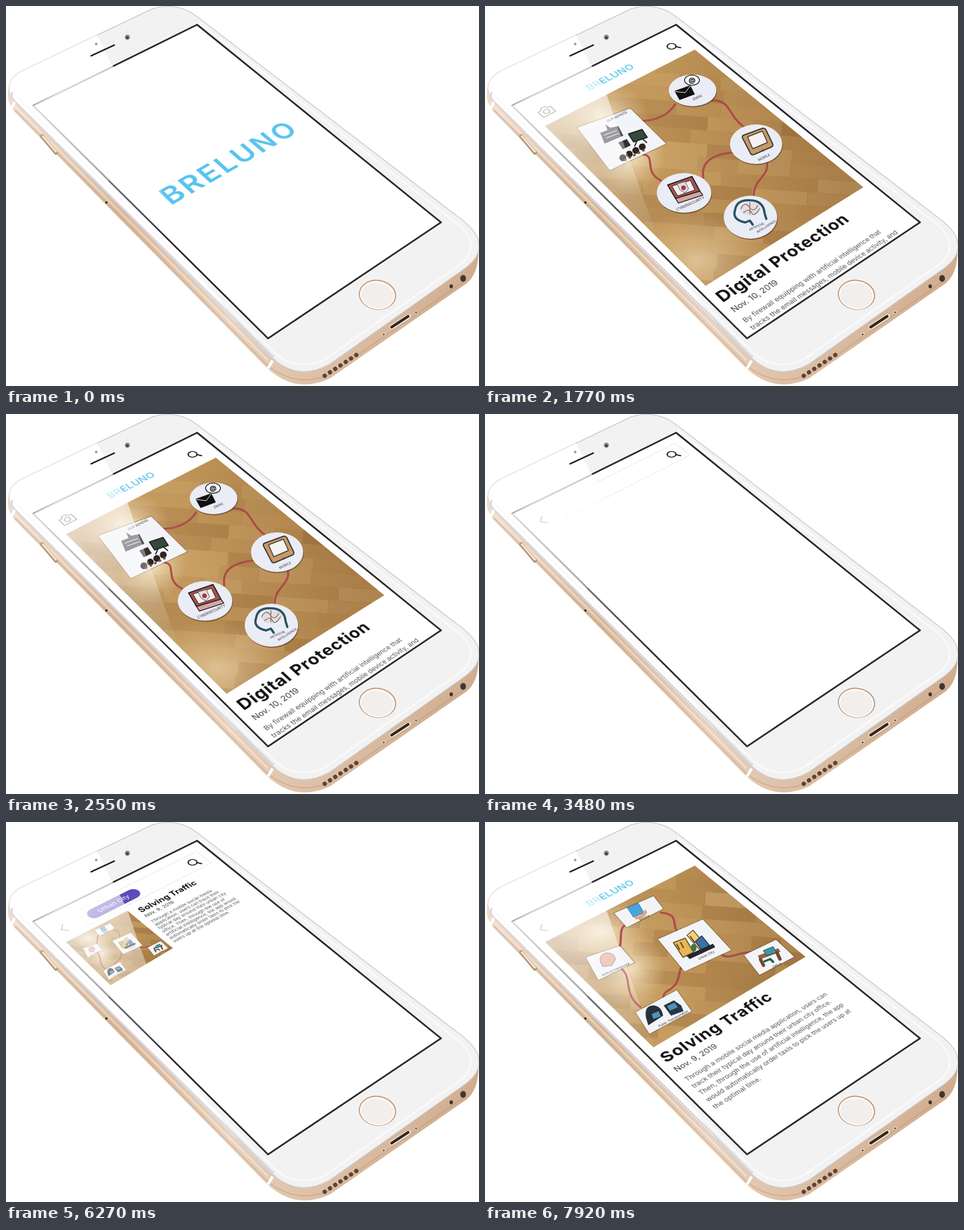
These frames come from a looping animation (834 px wide and 671 px high, 8 s). An HTML page:

```html
<!DOCTYPE html>
<html lang="en">
<head>
<meta charset="utf-8">
<title>Phone app demo</title>
<style>
  html, body { margin: 0; width: 100%; height: 100%; overflow: hidden; background: #fff; }
  #stage { position: relative; width: 834px; height: 671px; overflow: hidden; }
  #stage > *, .layer, .layer > * { position: absolute; left: 0; top: 0; }
  .layer { width: 834px; height: 671px; }
  .screen { transform-origin: 0 0; }
  text { font-family: Inter, "Open Sans", sans-serif; }
</style>
</head>
<body>
<div id="stage">
  <svg width="834" height="671" fill="none">
    <defs>
      <linearGradient id="gold" x1="0" y1="150" x2="834" y2="560" gradientUnits="userSpaceOnUse">
        <stop stop-color="#f0dfd0"/><stop offset=".3" stop-color="#d9b99a"/>
        <stop offset=".58" stop-color="#ead3be"/><stop offset="1" stop-color="#cda888"/>
      </linearGradient>
      <linearGradient id="wood" x1="120" y1="300" x2="620" y2="230" gradientUnits="userSpaceOnUse">
        <stop stop-color="#bd9a68"/><stop offset=".4" stop-color="#bf9559"/><stop offset="1" stop-color="#9f733f"/>
      </linearGradient>
      <radialGradient id="shine">
        <stop stop-color="#fff3d8" stop-opacity=".8"/><stop offset="1" stop-color="#f3dcb0" stop-opacity="0"/>
      </radialGradient>
      <linearGradient id="glare" x1="100" y1="140" x2="290" y2="425" gradientUnits="userSpaceOnUse">
        <stop stop-color="#fff" stop-opacity=".72"/><stop offset=".45" stop-color="#fff" stop-opacity=".4"/>
        <stop offset="1" stop-color="#fff" stop-opacity="0"/>
      </linearGradient>
      <clipPath id="face"><path id="facePath" d="M32 113L258 5Q302 -9 340 21L802 376Q862 422 811 462L570 633Q514 664 468 620L13 166Q-8 132 32 113Z"/></clipPath>
      <clipPath id="tall"><path d="M106 212L370 77L667 320L389 494Z"/></clipPath>
      <clipPath id="short"><path d="M106 212L370 77L565 238L297 398Z"/></clipPath>
    </defs>
    <path fill="url(#gold)" d="M10 130Q-6 160 14 186L455 634Q508 688 572 657L812 490Q834 472 833 430L790 400L340 25Z"/>
    <path d="M16 184L458 632Q510 676 570 651L812 483" stroke="#b58f70" stroke-opacity=".4" stroke-width="2"/>
    <path d="M11 172L462 626" stroke="#fff" stroke-opacity=".5" stroke-width="2"/>
    <path d="M9 182l9-17M462 640l8-14" stroke="#fff" stroke-width="5"/>
    <use href="#facePath" fill="#f2f2f2" stroke="#c9c9cd" stroke-width="1.5"/>
    <g clip-path="url(#face)">
      <path fill="#fff" d="M120 -20L165 60L187 105L330 460L470 640L-10 300V0Z"/>
      <path d="M17 158L474 613Q514 647 562 624L804 454Q838 422 798 386L338 28" stroke="#fafafa" stroke-width="3"/>
      <path d="M12 152Q6 160 18 171L472 620" stroke="#d9d6e4" stroke-width="3"/>
    </g>
    <path d="M64 230L88 259" stroke="#b4906f" stroke-width="7" stroke-linecap="round"/>
    <path d="M65 230L88 257" stroke="#f2e2d2" stroke-width="4" stroke-linecap="round"/>
    <circle cx="177" cy="347" r="2" fill="#222"/>
    <path d="M150 88L191 69" stroke="#222" stroke-width="2.5" stroke-linecap="round"/>
    <circle cx="159" cy="67" r="2.2" fill="#999"/>
    <circle cx="214" cy="55" r="4.5" fill="#8a8d96"/><circle cx="214" cy="56" r="2.5" fill="#39415c"/>
    <g transform="rotate(8 655 510)">
      <ellipse cx="655" cy="510" rx="32" ry="25.5" fill="#f1eeec" stroke="#c39a7b" stroke-width="2"/>
      <ellipse cx="655" cy="511" rx="29.5" ry="23.5" stroke="#fff" stroke-width="2"/>
    </g>
    <path d="M562 653L618 616" stroke="#5d4434" stroke-width="7.5" stroke-linecap="round" stroke-dasharray=".1 11"/>
    <path d="M680 567L710 548" stroke="#f5e8dc" stroke-width="8" stroke-linecap="round"/>
    <path d="M680 567L709 548" stroke="#302822" stroke-width="5" stroke-linecap="round"/>
    <g fill="#3e3534"><ellipse cx="806" cy="481" rx="5" ry="6"/><ellipse cx="785" cy="495" rx="3" ry="3.5"/></g>
    <g fill="#72584a" stroke="#fff"><circle cx="723" cy="541" r="2.5"/><circle cx="666" cy="580" r="2.5"/></g>
    <path fill="#fff" d="M48 176L337 33L767 382L462 587Z"/>
  </svg>
  <div id="layers"></div>
  <svg width="834" height="671" fill="none">
    <path d="M48 176L337 33L767 382L462 587Z" stroke="#29292b" stroke-width="3" stroke-linejoin="round"/>
    <path fill="url(#glare)" d="M40 180L187 103L213 152Q236 222 262 290L302 404L330 460Z"/>
    <path d="M187 105L48 176L180 309" stroke="#fff" stroke-opacity=".4" stroke-width="4"/>
  </svg>
</div>
<script>
const LOOP = 8000, STEP = 30, W = 375, H = 667;
const CORNERS = [[48, 176], [337, 33], [767, 382], [462, 587]];
const BLUE = '#58c4ef';

// Perspective transform that puts a W x H rectangle on the four corners.
function perspective([[x0, y0], [x1, y1], [x2, y2], [x3, y3]]) {
  const sx = x0 - x1 + x2 - x3, sy = y0 - y1 + y2 - y3;
  const ax = x1 - x2, ay = y1 - y2, bx = x3 - x2, by = y3 - y2;
  const den = ax * by - bx * ay;
  const g = (sx * by - bx * sy) / den, h = (ax * sy - sx * ay) / den;
  const right = [x1 - x0 + g * x1, y1 - y0 + g * y1, 0, g].map(n => n / W);
  const down = [x3 - x0 + h * x3, y3 - y0 + h * y3, 0, h].map(n => n / H);
  return `matrix3d(${[...right, ...down, 0, 0, 1, 0, x0, y0, 0, 1]})`;
}
const matrix = perspective(CORNERS);

function random(seed) {
  return () => (seed = (seed * 16807) % 2147483647) / 2147483647;
}

const text = (x, y, size, str, attrs = '') =>
  `<text x="${x}" y="${y}" font-size="${size}" ${attrs}>${str}</text>`;
const centered = (x, y, size, str, attrs = '') => text(x, y, size, str, `text-anchor="middle" ${attrs}`);
const path = (d, fill = 'none', stroke = 'none', width = 1) =>
  `<path d="${d}" fill="${fill}" stroke="${stroke}" stroke-width="${width}" stroke-linecap="round" stroke-linejoin="round"/>`;
const ellipse = (x, y, rx, ry, fill) => `<ellipse cx="${x}" cy="${y}" rx="${rx}" ry="${ry}" fill="${fill}"/>`;
const box = (x, y, w, h, fill, r = 0, extra = '') =>
  `<rect x="${x}" y="${y}" width="${w}" height="${h}" rx="${r}" fill="${fill}" ${extra}/>`;
const label = (x, y, size, str, angle = -26) =>
  centered(0, 0, size, str, `fill="#333" transform="translate(${x} ${y}) rotate(${angle})"`);

const page = box(0, 0, W, H, '#fff');
const wordmark = (x, y, size, spacing, weight) =>
  centered(x, y, size, 'BRELUNO', `font-weight="${weight}" fill="${BLUE}" letter-spacing="${spacing}"`);
const headerMark = wordmark(184.5, 54, 21.5, 0.3, 500);
const magnifier = path('M334 53L339 61', 'none', '#111', 3.2) +
  '<circle cx="328" cy="47" r="8.5" fill="none" stroke="#111" stroke-width="2.4"/>';
const backArrow = path('M37.5 40L28 50L37 60', 'none', '#555', 1.5);
const camera = path('M27 44h6l3-5h8l3 5h6v18H27Z', 'none', '#333', 1.6) +
  '<circle cx="40" cy="52" r="5.5" fill="none" stroke="#333" stroke-width="1.6"/>';
const searchBar = box(75, 25, 279, 46, '#fff', 0, 'stroke="#dedede"') + magnifier + backArrow;

const paragraph = (x, y, size, leading, lines) =>
  lines.map((line, i) => text(x, y + i * leading, size, line, 'fill="#555"')).join('');
const story = (photoEnd, title, date, lines) =>
  text(14, photoEnd + 41, 30.4, title, 'font-weight="700" letter-spacing="1" fill="#111"') +
  text(16, photoEnd + 67, 14.6, date, 'fill="#333"') +
  paragraph(17, photoEnd + 93, 12.2, 18, lines);

function wood(clip, seed, content) {
  const rnd = random(seed);
  const shades = ['#d9b479', '#80542a', '#cfa465', '#946536', '#e6c690'];
  let planks = '';
  for (let y = 70; y < 500; y += 24) {
    for (let x = 80 - rnd() * 60; x < 690;) {
      const length = 50 + rnd() * 90;
      planks += box(x | 0, y, length | 0, 23.5, shades[rnd() * 5 | 0], 0, `opacity="${(0.06 + rnd() * 0.2).toFixed(2)}"`);
      x += length;
    }
  }
  return `<g clip-path="url(#${clip})">${box(90, 60, 600, 450, 'url(#wood)')}
    <g transform="rotate(4 300 300)">${planks}</g>
    ${ellipse(205, 195, 85, 62, 'url(#shine)')}${ellipse(258, 262, 60, 70, 'url(#shine)')}
    <g opacity=".55">${ellipse(375, 450, 130, 90, 'url(#shine)')}</g></g>${content}`;
}

const thread = d => path(d, 'none', '#8d3030', 3.2) + path(d, 'none', '#c65360', 1.6);
const card = d => path(d, '#4a301866', '#4a301844', 3) + path(d, '#f3f4f8');
const disc = (x, y, rx, ry) => ellipse(x + 1, y + 2, rx, ry, '#4a301888') + ellipse(x, y, rx, ry, '#eaecf6');

const securityPhoto = wood('tall', 11,
  thread('M272 203C300 203 322 194 335 174') + thread('M400 167C432 164 430 195 456 213') +
  thread('M440 258C405 262 380 272 385 303') + thread('M278 262C303 264 278 292 310 308') +
  thread('M497 276C502 302 472 305 474 338') +
  card('M163 215L256 181L319 243L220 290Z') +
  label(234, 197, 6, 'OUR SCHOOL') +
  path('M203 224l13-5-4-10 9 6 14-3 9 17-33 14Z', '#51525a') + path('M210 228l22-8M214 233l22-8', 'none', '#c9cad2', 1.5) +
  path('M253 226l24-8 9 14-24 8Z', '#354a3b', '#222', 2) + path('M268 238l-4 9M277 234l8 7', 'none', '#222', 2) +
  path('M235 241l15-6 7 11-14 7Z', '#33302e') +
  path('M243 268l39-22', 'none', '#2b2522', 12).replace('/>', ' stroke-dasharray=".1 13"/>') +
  path('M247 272l34-18', 'none', '#7b5640', 4).replace('/>', ' stroke-dasharray="1 8"/>') +
  disc(366, 149, 42, 28) + path('M334 150l28-10 8 16-27 10Z', '#111') + path('M335 151l18 2 9-12', 'none', '#fff') +
  `<ellipse cx="365" cy="131" rx="13" ry="9" fill="#fff" stroke="#222" stroke-width="1.6"/>` +
  centered(365, 135, 12, '@', 'font-weight="700"') + label(376, 163, 6, 'EMAIL') +
  disc(478, 244, 46, 35) + path('M456 228l33-12q4-1 6 2l12 25q2 4-2 6l-30 13q-5 2-7-2l-14-27q-1-4 2-5Z', '#c49a68', '#3c3430', 2) +
  path('M463 231l26-10 9 20-26 11Z', '#f6f4f2', '#3c3430', 1.5) + ellipse(490, 255, 1.6, 1.6, '#3c3430') + label(493, 269, 6, 'MOBILE') +
  disc(351, 330, 48, 35) + path('M322 316l43-15 14 26-43 13Z', '#a4534f', '#2c2424', 2) +
  path('M330 318l32-10 8 17-30 10Z', '#f4eeee', '#2c2424') + path('M339 314l14-4 6 13-7 7-8-5Z', '#ddd', '#555') +
  ellipse(350, 321, 4, 4, '#b22e38') + path('M336 340l43-13 5 7-43 14Z', '#d6a6a0', '#2c2424', 1.5) + label(363, 351, 6.5, 'CYBERSECURITY', -24) +
  disc(468, 373, 47, 38) + path('M458 382Q435 377 441 360Q444 342 466 343Q491 343 493 366L496 376', 'none', '#29545f', 4) +
  path('M459 382l8-3 5 7', 'none', '#29545f', 4) + ellipse(468, 358, 18, 12, '#e5dcde') +
  path('M451 358q7-14 15-3t15-3M456 365q10-9 14 0t14-7M467 347v20', 'none', '#695055', 1.2) +
  label(480, 391, 5.5, 'ARTIFICIAL', -24) + label(497, 391, 5.5, 'INTELLIGENCE', -32));

const trafficPhoto = wood('short', 29,
  thread('M257 177C230 185 245 205 236 226') + thread('M310 160C345 163 327 180 340 195') +
  thread('M412 230C430 247 440 230 474 229') + thread('M360 246C331 255 355 280 322 298C310 306 315 316 320 319') +
  thread('M237 257C263 272 240 300 274 327') +
  card('M228 161L297 131L314 153L250 186Z') + path('M251 151l19-8 10 17-18 8Z', '#4aa4dc', '#276a99') +
  path('M262 167q13 1 21-13l3 6q-8 13-20 12Z', '#e4a37d') + label(282, 171, 6, 'Mobile') +
  card('M305 207L384 172L434 226L352 264Z') + path('M332 213l21-8 15 25-19 9Z', '#e7b657', '#5a431f', 1.5) +
  path('M356 200l11-9 23 28-12 6Z', '#f2cf75', '#5a431f', 1.2) + path('M371 211l11-10 14 17-14 8Z', '#3c70a8', '#1c3048', 1.5) +
  path('M338 216l5 9M345 213l5 9M362 202l8 11', 'none', '#5a431f', 2) +
  path('M355 236l47-21 4 6-45 21Z', '#24282b') + ellipse(368, 222, 5, 7, '#42764a') + label(391, 237, 6, 'Urban City') +
  card('M178 239L238 219L263 248L200 279Z') + path('M207 255l-4-9q-2-13 12-15 14 0 15 12l-6 10Z', '#e8a798', '#8c6262') + label(231, 262, 5.5, 'Artificial Intelligence', -24) +
  card('M457 235L513 208L545 238L484 270Z') + path('M481 236l36-13 4 6-37 14Z', '#96613f') + path('M486 243l5 10M515 231l5 11', 'none', '#75482e', 6) +
  path('M491 227l17-7 6 10-17 6Z', '#3c96a5', '#273b42') + path('M493 246l10-4 5 5', 'none', '#275f55', 4) + label(516, 255, 6, 'Office') +
  card('M266 336L338 297L364 334L290 374Z') + path('M284 346q-4-21 12-22 15 0 18 18l-26 17Z', '#27303c') +
  path('M294 339l12-5 4 9-13 5Z', '#5191b8') + path('M315 324l18-9 13 9 4 10-22 8Z', '#263746') +
  path('M321 325l13-6 6 8-14 6Z', '#5191b8') + label(333, 349, 5.8, 'Public Transportation', -28));

const chip = box(86, 37, 113, 27, '#5b4bbd', 13.5) + centered(142, 55, 13.5, 'Urban City', 'fill="#fff"');
const resultText =
  text(167, 103, 18.3, 'Solving Traffic', 'font-weight="700" fill="#111"') +
  text(167, 119, 11, 'Nov. 9, 2019', 'fill="#333"') +
  paragraph(167, 138, 9.6, 11.2, ['Through a mobile social media', 'application, users can track their',
    'typical day around their urban city', 'office. Then, through the use of',
    'artificial intelligence, the app would', 'automatically order taxis to pick the', 'users up at the optimal time.']);

function keyboard() {
  const rows = [496.5, 548, 599.5, 651];
  const key = (cx, row, w, str, fill = '#fff', size = 20, ink = '#111') =>
    box(cx - w / 2, rows[row] - 18.5, w, 41, '#85898f', 5) + box(cx - w / 2, rows[row] - 20, w, 40.5, fill, 5) +
    centered(cx, rows[row] + size * 0.32, size, str, `fill="${ink}"`);
  const letters = (str, row, first) => [...str].map((c, i) => key(first + i * 37.6, row, 31.5, c)).join('');
  const gray = '#abb6bb';
  return box(0, 469, W, 198, '#d9dade') +
    letters('qwertyuiop', 0, 16) + letters('asdfghjkl', 1, 34) + letters('zxcvbnm', 2, 73) +
    key(21, 2, 44, '', gray) + key(350, 2, 45, '', gray) +
    key(20, 3, 42, '123', gray, 16) + key(66, 3, 42, '', gray) + key(109, 3, 36, '') +
    key(204, 3, 146, 'space', '#fff', 16) + key(327, 3, 91, 'Go', '#087cff', 16, '#fff') +
    path('M21 590l-10 10h5v9h10v-9h5Z', 'none', '#111', 1.7) +
    path('M338 599l7-8h16v16h-16ZM348 595l8 8M356 595l-8 8', 'none', '#222', 1.5) +
    '<circle cx="66" cy="652" r="10" fill="none" stroke="#222" stroke-width="1.5"/>' +
    path('M60 654q6 10 12 0Z', '#222') + ellipse(62.5, 649, 1.4, 1.8, '#222') + ellipse(69.5, 649, 1.4, 1.8, '#222') +
    box(106, 642, 6, 13, '#222', 3) + path('M102 650q0 8 7 8t7-8M109 658v5M105 663h8', 'none', '#222', 1.4);
}

const layers = [
  { start: -Infinity, ui: wordmark(192, 355, 55, 4, 600) },
  { start: 1440, art: securityPhoto, ui: page + headerMark + magnifier + camera +
      story(550, 'Digital Protection', 'Nov. 10, 2019',
        ['By firewall equipping with artificial intelligence that', 'tracks the email messages, mobile device activity, and']) },
  { start: 2580, ui: page + searchBar },
  { start: 4290, ui: keyboard() },
  { start: 5640, ui: page + searchBar + chip + resultText,
    art: `<g transform="translate(106 212) scale(.41) translate(-106 -212)">${trafficPhoto}</g>` },
  { start: 7080, art: trafficPhoto, ui: page + headerMark + backArrow +
      story(404, 'Solving Traffic', 'Nov. 9, 2019',
        ['Through a mobile social media application, users can', 'track their typical day around their urban city office.',
          'Then, through the use of artificial intelligence, the app', 'would automatically order taxis to pick the users up at',
          'the optimal time.']) },
];

const host = document.getElementById('layers');
host.innerHTML = layers.map(({ ui, art = '' }) => `<div class="layer">
  <svg class="screen" width="${W}" height="${H}" style="transform:${matrix}">${ui}</svg>
  <svg width="834" height="671">${art}</svg></div>`).join('');

// Each screen dissolves in fast at first, then settles.
const dissolve = age => age < 0 ? 0 : age > 400 ? 1 : 1 - Math.exp(-(age + STEP) / 22);

function draw(now) {
  const t = Math.floor((now % LOOP) / STEP) * STEP;
  layers.forEach(({ start }, i) => { host.children[i].style.opacity = dissolve(t - start); });
}
const begin = performance.now();
function tick() {
  draw(performance.now() - begin);
  requestAnimationFrame(tick);
}
tick();
</script>
</body>
</html>
```
